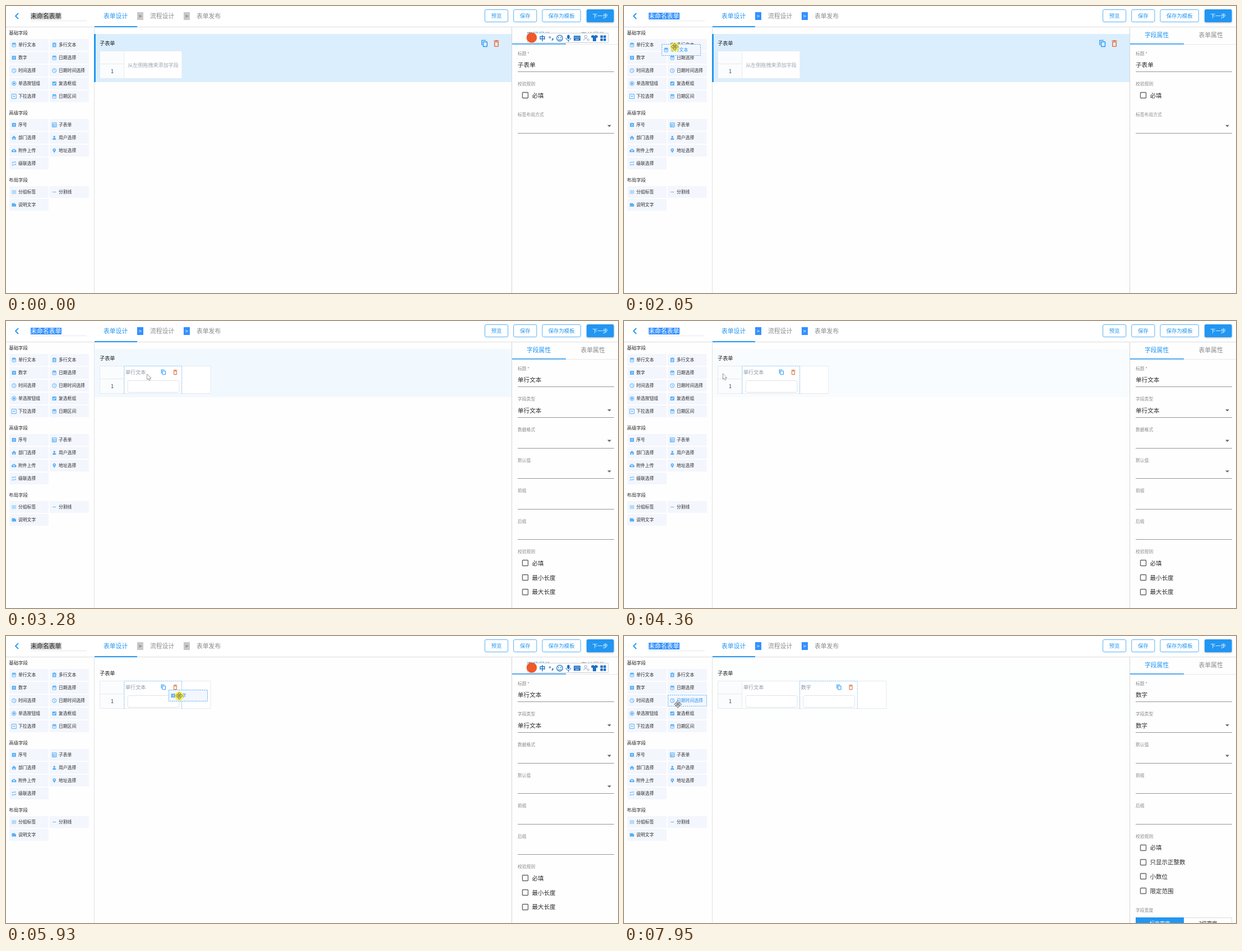
An HTML page with a canvas for the animation above (8000 ms loop, 1092x513 px).

```html
<!DOCTYPE html>
<html lang="zh-CN">
<head>
<meta charset="utf-8">
<title>表单设计</title>
<style>
html, body { margin: 0; width: 100%; height: 100%; overflow: hidden; background: #fefefe; }
canvas { display: block; }
</style>
</head>
<body>
<canvas id="stage" width="1092" height="513"></canvas>
<script>
const g = document.getElementById('stage').getContext('2d');
const BLUE = '#2196f3', SOFT = '#58aff5', INK = '#2b2b2b', GREY = '#8a8a8a', EDGE = '#e6e9ee', IME = '#1b6fc4';
const FONT = '"Noto Sans CJK SC", "Noto Sans CJK", "Noto Sans", sans-serif';
const LOOP = 8000, ENTER = 170, PRESS1 = 1810, DROP1 = 3200, PRESS2 = 5340, SLOT2 = 6000, DROP2 = 7420;
const ITEM_W = 70, ITEM_H = 21, COL_W = 102.7, COL_X = 211;

const GROUPS = [
  ['基础字段', 47, '单行文本 cal,多行文本 clip,数字 num,日期选择 cal,时间选择 clock,日期时间选择 clock,单选按钮组 radio,复选框组 check,下拉选择 drop,日期区间 cal'],
  ['高级字段', 190, '序号 num,子表单 table,部门选择 home,用户选择 user,附件上传 cloud,地址选择 pin,级联选择 loop'],
  ['布局字段', 310, '分组标签 lines,分割线 minus,说明文字 note']
];
const ITEMS = GROUPS.flatMap(([, top, list]) => list.split(',').map((entry, i) => {
  const [label, icon] = entry.split(' ');
  return { label, icon, x: 6 + i % 2 * 72, y: top + 12 + (i >> 1) * 23 };
}));

// Pointer strokes: each eases from wherever the last one ended
const REST = { x: 1083, y: 503 };
const STROKES = [
  { from: 670, to: 1190, x: 26, y: 46 },
  { from: 1190, to: 1420, x: 44, y: 60 },
  { from: 1420, to: 1650, x: 29, y: 64 },
  { from: PRESS1, to: 2500, x: 248, y: 95 },
  { from: 2580, to: 2820, x: 252, y: 95 },
  { from: 4060, to: 4840, x: 25, y: 93 },
  { from: PRESS2 + 50, to: 6090, x: 352, y: 109 },
  { from: 6320, to: 6640, x: 295, y: 109 },
  { from: 6880, to: 7250, x: 351, y: 106 },
  { from: 7800, to: 7950, x: 96, y: 122 }
];
const DRAGS = [
  { from: PRESS1, to: DROP1, item: ITEMS[0], dx: 23, dy: 5 },
  { from: PRESS2, to: DROP2, item: ITEMS[2], dx: 19, dy: 11 }
];

const ramp = (t, a, b) => Math.min(1, Math.max(0, (t - a) / (b - a)));
const smooth = p => p * p * (3 - 2 * p);

function pointer(t) {
  return STROKES.reduce((p, s) => {
    const k = smooth(ramp(t, s.from, s.to));
    return { x: p.x + (s.x - p.x) * k, y: p.y + (s.y - p.y) * k };
  }, REST);
}
function tintLevel(t) {
  if (t < DROP1) return 1;
  const hover = 1 - ramp(t, 4200, 4450) + ramp(t, DROP2, DROP2 + 20) - ramp(t, 7800, 7970);
  return .38 * hover + .62 * (1 - ramp(t, DROP1, DROP1 + 80));
}

function text(s, x, cy, size, color = INK, align = 'left', weight = 400) {
  g.font = `${weight} ${size}px ${FONT}`;
  g.textAlign = align;
  g.fillStyle = color;
  g.fillText(s, x, cy + size * .38);
}
function fill(x, y, w, h, color, radius = 0) {
  g.beginPath();
  g.roundRect(x, y, w, h, radius);
  g.fillStyle = color;
  g.fill();
}
function pen(color, width = 1, dash = []) {
  g.setLineDash(dash);
  g.strokeStyle = color;
  g.lineWidth = width;
  g.stroke();
  g.setLineDash([]);
}
function frame(x, y, w, h, color, width = 1, radius = 0, dash) {
  g.beginPath();
  g.roundRect(x, y, w, h, radius);
  pen(color, width, dash);
}
function line(points, color, width = 1, dash) {
  g.beginPath();
  for (let i = 0; i < points.length; i += 2) g.lineTo(points[i], points[i + 1]);
  pen(color, width, dash);
}
// Triangle with its base centred on (x, y); negative height points up
function tri(x, y, w, h, color) {
  g.beginPath();
  g.moveTo(x - w / 2, y);
  g.lineTo(x + w / 2, y);
  g.lineTo(x, y + h);
  g.fillStyle = color;
  g.fill();
}
function arc(x, y, r, color, width = 0, from = 0, to = Math.PI * 2) {
  g.beginPath();
  g.arc(x, y, r, from, to);
  g.fillStyle = color;
  if (width) pen(color, width); else g.fill();
}
function moved(x, y, draw, scale = 1) {
  g.save();
  g.translate(x, y);
  g.scale(scale, scale);
  draw();
  g.restore();
}
function turns(n, draw) {
  for (let i = 0; i < n; i++) {
    draw();
    g.rotate(Math.PI * 2 / n);
  }
}
const bars = (n, gap, draw) => { for (let i = 0; i < n; i++) draw((i - (n - 1) / 2) * gap); };

const ICONS = {
  cal() { frame(-3, -3, 6, 6.5, SOFT, 1, .6); fill(-3, -3, 6, 2, SOFT); bars(2, 3, x => fill(x - .5, -4.2, 1, 2, SOFT)); fill(-1.5, 0, 3, 1, SOFT); },
  clip() { fill(-3.3, -3.5, 6.6, 7.5, SOFT); fill(-1, -4.3, 2, 1.5, SOFT); bars(3, 1.7, y => fill(-1.8, y, 3.6, .8, '#fff')); },
  num() { fill(-3.5, -3.5, 7, 7, SOFT, .5); fill(-.4, -2, 1, 4, '#fff'); },
  clock() { arc(0, 0, 3.6, SOFT, 1); line([0, -2.2, 0, .3, 1.7, 1.3], SOFT, .9); },
  radio() { arc(0, 0, 3.7, SOFT, 1); arc(0, 0, 2, SOFT); },
  check() { fill(-3.6, -3.6, 7.2, 7.2, SOFT, .5); line([-2, 0, -.6, 1.5, 2.2, -1.6], '#fff', 1.1); },
  drop() { frame(-4, -4, 8, 8, SOFT); tri(0, -1, 4, 2.5, SOFT); },
  table() { frame(-3.8, -3.8, 7.6, 7.6, SOFT); bars(3, 1.9, y => fill(-3.8, y, 7.6, .8, SOFT)); fill(-1.5, -1.6, .8, 5.4, SOFT); },
  home() { tri(0, .4, 8.6, -4.2, SOFT); bars(2, 3.8, x => fill(x - 1.1, 0, 2.2, 3.5, SOFT)); },
  user() { arc(0, -1.8, 1.8, SOFT); arc(0, 3.5, 3.2, SOFT, 0, Math.PI); },
  cloud() { bars(2, 4.6, x => arc(x, .9, 2.1, SOFT)); arc(0, -.2, 2.9, SOFT); tri(0, .3, 3.4, -2.2, '#fff'); fill(-.6, 0, 1.2, 1.8, '#fff'); },
  pin() { arc(0, -1.3, 2.7, SOFT); tri(0, -.4, 5, 4.6, SOFT); arc(0, -1.3, 1, '#fff'); },
  loop() { turns(2, () => { line([-3, 0, -3, -2.3, 2.5, -2.3], SOFT); tri(2.8, -2.3, 2.4, -1.7, SOFT); }); },
  lines() { bars(3, 2.4, y => fill(-4, y - .4, 8, .9, SOFT)); },
  minus() { fill(-2.8, -.5, 5.6, 1, SOFT); },
  note() { fill(-3.8, -3, 7.6, 6, SOFT, .5); fill(1.8, -3, 2, 1.6, '#fff'); }
};

function item({ label, icon }, x, y, active) {
  fill(x, y, ITEM_W, ITEM_H, '#f3f6fd');
  if (active) frame(x + .5, y + .5, ITEM_W - 1, ITEM_H - 1, '#4aa9f5', 1, 0, [2, 1.5]);
  moved(x + 8.2, y + 10.5, ICONS[icon]);
  text(label, x + 16, y + 10.5, 7.8, active ? BLUE : INK);
}
function copyIcon(x, y, scale) {
  moved(x, y, () => {
    frame(-2.5, -3, 7, 8.5, BLUE, 1.4, .8);
    line([-5, 3, -5, -5.6, 2, -5.6], BLUE, 1.4);
  }, scale);
}
function trashIcon(x, y, scale, color) {
  moved(x, y, () => {
    frame(-3.3, -2.6, 6.6, 8, color, 1.4, .8);
    fill(-4.8, -5.2, 9.6, 1.3, color);
    fill(-1.7, -6, 3.4, 1.4, color);
  }, scale);
}

function header(focused) {
  fill(0, 0, 1092, 37, '#fff');
  fill(0, 37, 1092, 1, '#dedede');
  line([22, 13, 17, 18, 22, 23], BLUE, 1.8);
  const mark = focused ? '#3390ff' : '#c8c8c8';
  fill(44, 12, 55, 12, mark);
  text('未命名表单', 44.3, 17.5, 10.8, focused ? '#fff' : INK);
  fill(44, 26, 100, 1, '#e6e6e6');
  ['表单设计', '流程设计', '表单发布'].forEach((label, i) => {
    const x = 174 + i * 83;
    text(label, x, 18, 10.8, i ? GREY : BLUE);
    if (!i) return;
    fill(x - 23, 11, 11, 14, mark);
    text('>', x - 17.5, 18, 9.5, focused ? '#fff' : '#555', 'center');
  });
  fill(158, 36, 76, 2, BLUE);
  let x = 854.5;
  for (const label of ['预览', '保存', '保存为模板']) {
    const w = 23 + label.length * 9.1;
    frame(x, 6.5, w, 22, '#57b0f6', 1, 2.5);
    text(label, x + w / 2, 17.5, 9.4, BLUE, 'center');
    x += w + 10;
  }
  g.save();
  g.shadowColor = 'rgba(0,0,0,.3)';
  g.shadowBlur = 3;
  g.shadowOffsetY = 1;
  fill(1036, 6, 48.5, 23, BLUE, 2.5);
  g.restore();
  text('下一步', 1060, 17.5, 9.4, '#fff', 'center');
}

function sidebar(hover) {
  fill(157, 38, 1, 475, '#e0e0e0');
  for (const [title, top] of GROUPS) text(title, 5.3, top + .5, 8.4, INK);
  for (const it of ITEMS) item(it, it.x, it.y, it === hover);
}

function column(x, label, active) {
  text(label, x + 2, 92, 9.1, '#8b98a9');
  frame(x + 6, 106.5, 92, 21, '#dfe3e8', 1, 3);
  if (!active) return;
  line([x, 130, x, 80.5, x + COL_W, 80.5, x + COL_W, 130], '#86c5f8', 1, [2, 1.5]);
  copyIcon(x + 70, 91.5, .76);
  trashIcon(x + 91, 91.5, .76, '#d9743f');
}
const dropSlot = x => frame(x + 6, 84.5, 92, 42.5, '#d5d9dd', 1, 0, [1.5, 1.5]);

function subForm(t, overCell) {
  const selected = t < DROP1, nextX = COL_X + COL_W;
  g.globalAlpha = tintLevel(t);
  fill(157, 50, 745, 86, '#dbeefe');
  g.globalAlpha = 1;
  if (selected) {
    fill(157, 50, 3, 86, BLUE);
    copyIcon(854, 67, 1);
    trashIcon(875, 67, 1, '#ee6330');
  }
  text('子表单', 167, 67, 9.2, '#222', 'left', 500);
  const columns = selected ? 1 : t < SLOT2 ? 1.5 : t < DROP2 ? 2 : 2.5;
  const right = Math.round(COL_X + columns * COL_W);
  fill(167, 80, right - 167, 50, '#fff');
  fill(167, 80, 44, 50, '#fbfcfd');
  frame(167.5, 80.5, right - 167.5, 49, EDGE);
  fill(167, 103, 44, 1, EDGE);
  fill(210, 80, 1, 50, EDGE);
  text('1', 189.5, 116.3, 9.3, '#25466b', 'center');
  if (selected) {
    if (overCell) dropSlot(COL_X);
    else text('从左侧拖拽来添加字段', 217, 105.5, 9.1, '#9aa5b1');
    return;
  }
  fill(313, 80, 1, 50, EDGE);
  column(COL_X, '单行文本', t < DROP2);
  if (t >= DROP2) column(nextX, '数字', true);
  else if (t >= SLOT2) dropSlot(nextX);
}

function field(y, label, value = '', select = false) {
  text(label, 913, y, 7.8, GREY);
  text(value, 913, y + 20.3, 10.6);
  fill(913, Math.round(y + 32.6), 172, 1, '#949494');
  if (select) tri(1076.5, y + 18.6, 7, 3.6, '#666');
  return y + 54.6;
}
function checks(y, labels) {
  text('校验规则', 913, y, 7.8, GREY);
  y += 20.7;
  for (const label of labels) {
    frame(921.5, Math.round(y - 5.7) + .5, 10, 10, '#666', 1.4, 1);
    text(label, 938.5, y, 10.5);
    y += 25.7;
  }
  return y + 8.3;
}
function properties(t) {
  fill(902, 38, 1, 475, '#d4d4d4');
  text('字段属性', 929, 52, 10.8, BLUE);
  text('表单属性', 1025.5, 52, 10.8, GREY);
  fill(903, 68, 189, 1, '#e8e8e8');
  fill(903, 67, 96, 1.6, BLUE);
  const kind = t < DROP1 ? '子表单' : t < DROP2 ? '单行文本' : '数字';
  let y = field(84.8, '标题 *', kind);
  if (t < DROP1) {
    y = checks(y, ['必填']);
    field(y, '标签布局方式', '', true);
    return;
  }
  y = field(y, '字段类型', kind, true);
  if (t < DROP2) y = field(y, '数据格式', '', true);
  y = field(y, '默认值', '', true);
  y = field(y, '前缀');
  y = field(y, '后缀');
  if (t < DROP2) {
    checks(y, ['必填', '最小长度', '最大长度']);
    return;
  }
  y = checks(y, ['必填', '只显示正整数', '小数位', '限定范围']);
  text('字段宽度', 913, y, 7.8, GREY);
  frame(913.5, 503.5, 171, 22, '#dcdcdc');
  fill(913, 503, 86, 22, BLUE);
  text('标准宽度', 956, 513.3, 9.2, '#fff', 'center');
  text('2倍宽度', 1042, 513.3, 9.2, INK, 'center');
}

const IME_ICONS = [
  () => text('中', 0, 0, 11, IME, 'center', 700),
  () => { arc(-2, -1.5, 1.4, IME, 1); line([3, 0, 3.3, 2, 1.5, 4], IME, 1.8); },
  () => { arc(0, 0, 5.3, IME, 1.2); bars(2, 4, x => arc(x, -1.5, .9, IME)); arc(0, 0, 3, IME, 1, .3, Math.PI - .3); },
  () => { fill(-2.2, -6, 4.4, 7.5, IME, 2.2); arc(0, -.5, 4.2, IME, 1.1, 0, Math.PI); fill(-.6, 3.5, 1.2, 3, IME); },
  () => { fill(-6, -4.5, 12, 9, IME, 1); bars(2, 2.3, y => bars(4, 2.5, x => fill(x - .6, y - 2.2, 1.3, 1.2, '#fff'))); fill(-3, 2, 6, 1, '#fff'); },
  () => { arc(0, -3, 2.2, '#a9bfd6', 1.2); arc(0, 4, 3.6, '#a9bfd6', 1.2, Math.PI); arc(4.5, 3, 1.7, '#a9bfd6', 1); },
  () => { fill(-3, -5.5, 6, 11, IME, .5); fill(-5.8, -5, 11.6, 4.2, IME, 1.5); arc(0, -5.5, 1.3, '#fff'); },
  () => bars(2, 5.6, y => bars(2, 5.6, x => fill(x - 2.2, y - 2.2, 4.5, 4.5, IME, .5)))
];
function inputBar() {
  fill(930, 48, 144, 18, '#fff');
  frame(930.5, 48.5, 144, 17, '#c9ced4');
  arc(938, 56.5, 9.3, '#f0582a');
  IME_ICONS.forEach((draw, i) => moved(957 + i * 15.5, 57.5, draw));
}

function arrowCursor(x, y) {
  moved(x, y, () => {
    line([0, 0, 0, 9.5, 2.1, 7.6, 3.6, 11, 5.2, 10.3, 3.7, 7, 6.6, 7, 0, 0], '#222', .9);
    g.fillStyle = '#fff';
    g.fill();
  });
}
function moveCursor(x, y, pressed) {
  if (pressed) arc(x, y + .5, 8, 'rgba(255,238,40,.8)');
  const edge = pressed ? '#6c6420' : '#444', body = pressed ? '#f7ee9a' : '#fff';
  moved(x, y, () => turns(4, () => {
    tri(0, -3, 6.4, -4, edge);
    fill(-1.4, -3.6, 2.8, 3.6, edge);
    tri(0, -3.6, 4, -2.4, body);
    fill(-.6, -3.8, 1.2, 3.4, body);
  }));
}

function draw(t) {
  const { x, y } = pointer(t);
  const drag = DRAGS.find(d => t >= d.from && t < d.to);
  const hover = !drag && ITEMS.find(i => x > i.x && x < i.x + ITEM_W && y > i.y && y < i.y + ITEM_H);
  const focused = t >= PRESS1 && !(t >= 5500 && t < 6480);
  fill(0, 0, 1092, 513, '#fefefe');
  header(focused);
  sidebar(hover);
  subForm(t, drag && x > 205);
  properties(t);
  if (!focused) inputBar();
  if (drag) item(drag.item, Math.round(x - drag.dx), Math.round(y - drag.dy), true);
  if (t < ENTER) return;
  if (drag || hover) moveCursor(x, y, !!drag);
  else arrowCursor(x, y);
}

const start = performance.now();
function tick() {
  draw((performance.now() - start) % LOOP);
  requestAnimationFrame(tick);
}
tick();
</script>
</body>
</html>
```
